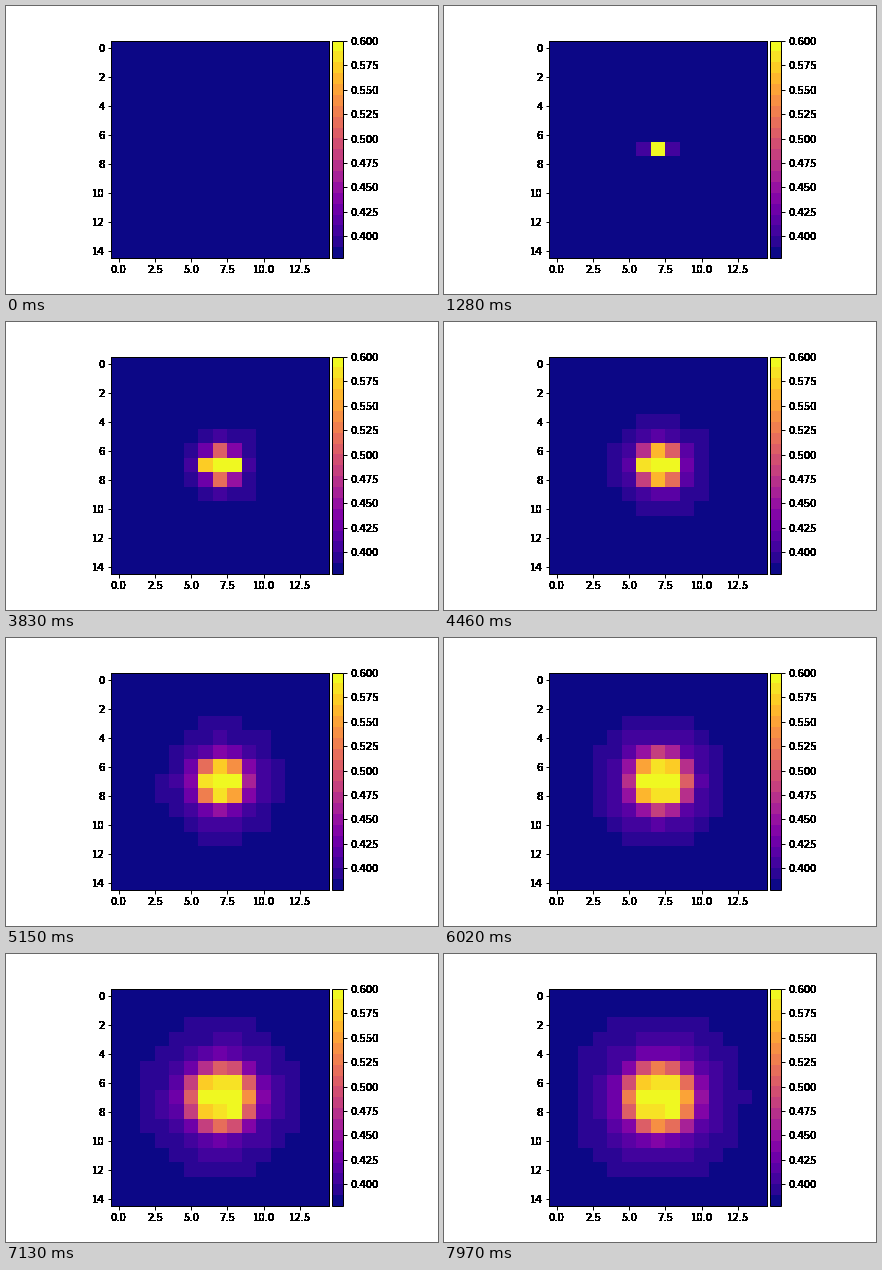
Animation, 432 px wide and 288 px high, one loop 8 s. Source, as a matplotlib script:

```python
import numpy as np
import matplotlib.pyplot as plt
from matplotlib.animation import FuncAnimation
from mpl_toolkits.axes_grid1 import make_axes_locatable

SIZE, MID = 15, 7
LEVELS = 20
VMIN, VMAX = 0.378, 0.6
LOOP, INTERVAL = 8000, 20
START, SECOND, SPREAD, TICK = 1280, 2060, 2300, 30

plt.rcParams.update({
    "font.family": "DejaVu Sans", "font.size": 10,
    "axes.linewidth": 1,
    "xtick.major.width": 1, "ytick.major.width": 1,
})

rows, cols = np.mgrid[:SIZE, :SIZE]
dx, dy = cols - MID - 0.08, rows - MID - 0.02
dist2 = dx**2 + dy**2
grain = np.random.default_rng(4).normal(0, 0.02, dist2.shape)
tilt = 1 + 0.015 * dx + 0.01 * dy + 0.05 * (dx**2 - dy**2) / dist2 + grain


def halo(t):
    """Glow whose radius eases out towards the edge of the grid."""
    radius = 7.5 * (1 - np.exp(-0.2705 * max(t / 1000 - 2.08, 0.01)))
    s = dist2 / radius**2
    glow = 1 + 18 * tilt / (1 + (s / 0.155)**2.7)
    return np.where(s < 1, glow, 0)


def seeds(t):
    """The bright middle cell and its two growing neighbours."""
    grid = np.zeros((SIZE, SIZE))
    side = 2 + max(t - SPREAD, 0) / 100
    grid[MID, MID - 1] = min(side, 18)
    grid[MID, MID] = 19
    grid[MID, MID + 1] = min(side + 3 * (t >= SECOND), 18.6)
    return grid


def values_at(t):
    levels = np.zeros((SIZE, SIZE))
    if t >= START:
        t = START + (t - START) // TICK * TICK
        levels = np.maximum(halo(t), seeds(t))
    levels = np.clip(np.rint(levels), 0, LEVELS - 1)
    return VMIN + (levels + 0.5) / LEVELS * (VMAX - VMIN)


def harden(img, dpi):
    """Turn soft glyph edges into solid pixels."""
    img = img.copy()
    img[..., :3] = 0
    img[..., 3] = img[..., 3] > 0.02
    return img, 0, 0


fig, ax = plt.subplots(figsize=(6, 4), dpi=72, facecolor="white")
fig.subplots_adjust(left=0.125, right=0.9, bottom=0.125, top=0.88)
image = ax.imshow(values_at(0), cmap=plt.get_cmap("plasma", LEVELS),
                  vmin=VMIN, vmax=VMAX, interpolation="nearest")
ax.set_xticks(np.arange(0, 13, 2.5))
ax.set_yticks(range(0, SIZE, 2))
ax.xaxis.set_major_formatter("{x:.1f}")

cax = make_axes_locatable(ax).append_axes("right", size="5%", pad=0.05)
fig.colorbar(image, cax=cax, ticks=np.linspace(0.4, 0.6, 9), format="%.3f")

for label in (ax.get_xticklabels() + ax.get_yticklabels()
              + cax.get_yticklabels()):
    label.set_agg_filter(harden)


def update(i):
    image.set_data(values_at(i * INTERVAL))
    return [image]


anim = FuncAnimation(fig, update, frames=LOOP // INTERVAL,
                     interval=INTERVAL, repeat=True, repeat_delay=0)
plt.show()
```
